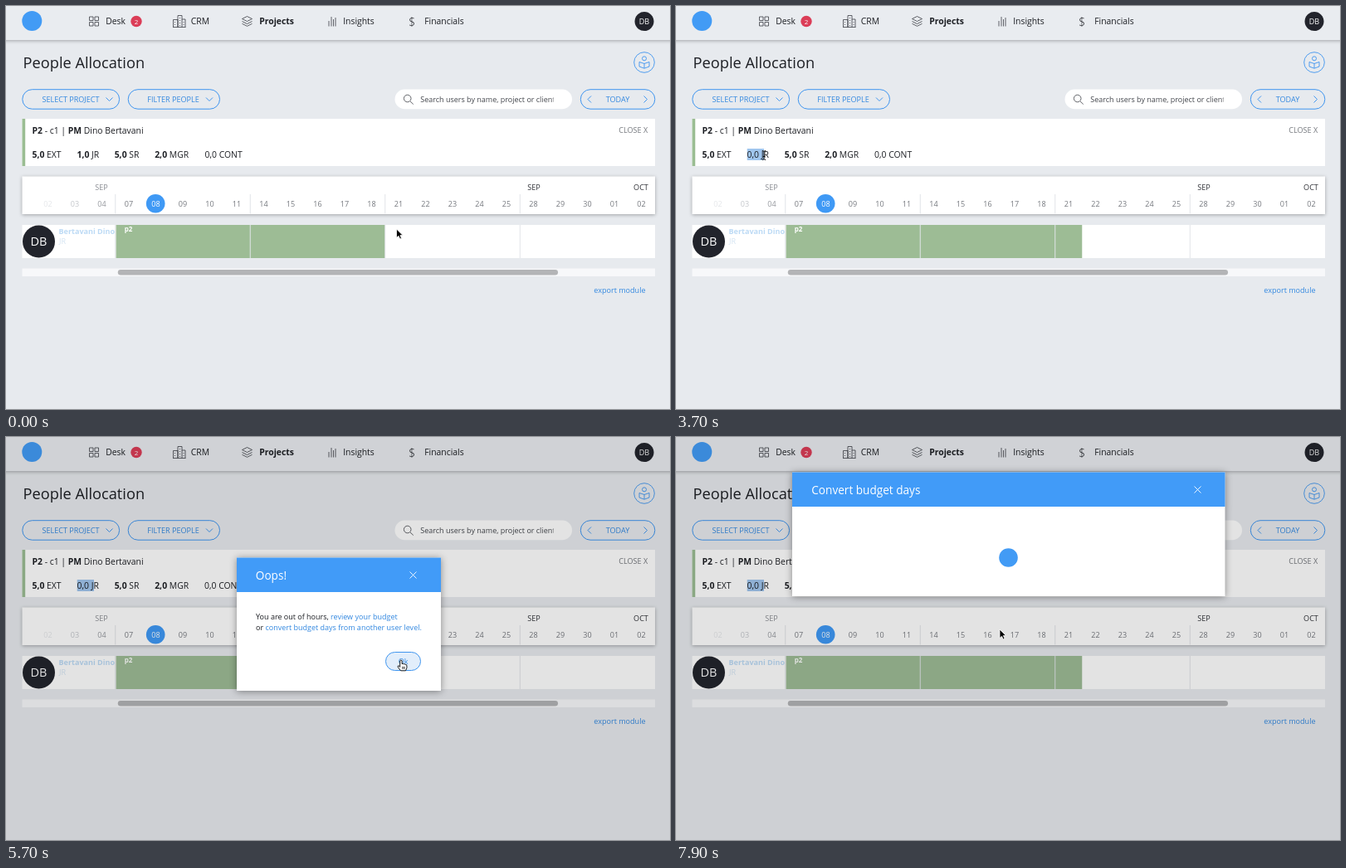
These frames come from a looping animation (800 px wide and 486 px high, 8 s). An HTML page:

```html
<!DOCTYPE html>
<html lang="en">
<head>
<meta charset="utf-8">
<title>People Allocation</title>
<style>
  html, body { margin: 0; width: 100%; height: 100%; overflow: hidden; background: #e7eaee; }
  svg { display: block; width: 100vw; height: 100vh; font-family: "Open Sans", "Noto Sans", sans-serif; font-size: 9.05px; }
  text { white-space: pre; }
  .nav, .stat { font-size: 10.4px; }
  .line { fill: none; stroke: #3f95ef; }
  .icon { fill: none; stroke: #3b3e45; stroke-width: .8; }
  .blue { fill: #3388e0; }
  .white { fill: #fff; }
  .mid { text-anchor: middle; }
  .bold { font-weight: 700; }
  .card { filter: drop-shadow(0 1px 2px rgba(0,0,0,.3)); }
  .modal { filter: drop-shadow(0 1px 4px rgba(0,0,0,.4)); }
</style>
</head>
<body>
<svg id="stage" viewBox="0 0 800 486" fill="#1d1f24">
  <rect width="800" height="486" fill="#e7eaee"/>

  <g id="topbar">
    <rect class="card" x="-5" y="-5" width="810" height="46" fill="#e9ecf0"/>
    <circle cx="31.3" cy="18" r="12" fill="#429bf5"/>
    <path class="icon" d="M100.5 13h4.5v4.5h-4.5zM107 13h4.500v4.500h-4.500zM100.500 19.500h4.500v4.500h-4.500zM107 19.500h4.500v4.500h-4.500z"/>
    <path class="icon" d="M201.500 25.500V16.500H207V25.500M207 25.500V11.500H212V25.500M212 16H216V25.500M201 25.500H216.500M203.500 19v1M203.500 22v1M209.500 14v1M209.500 17v1M209.500 20v1M209.500 23v1M214 19v1M214 22v1"/>
    <path class="icon" d="M290.500 12.500L296.500 15.500L290.500 18.500L284.500 15.500ZM284.500 18.500L290.500 21.500L296.500 18.500M284.500 21.300L290.500 24.300L296.500 21.300"/>
    <path class="icon" d="M389 24.500V18M392 24.500V13M394.500 24.500V16M397 24.500V14"/>
    <text x="485" y="24" font-size="14" font-weight="300">$</text>
    <g class="nav">
      <text x="120.200" y="22.300">Desk</text>
      <text x="222.700" y="22.300">CRM</text>
      <text class="bold" x="305.200" y="22.300">Projects</text>
      <text x="406.200" y="22.300">Insights</text>
      <text x="504.200" y="22.300">Financials</text>
    </g>
    <circle cx="157" cy="18.500" r="6.700" fill="#db3d57"/>
    <text class="mid white" x="157" y="21.500" font-size="8">2</text>
    <circle cx="769" cy="18.600" r="11.500" fill="#22242c"/>
    <text class="mid white" x="769" y="22" font-size="9">DB</text>
  </g>

  <text x="20.600" y="74.500" font-size="18.200">People Allocation</text>
  <g class="line" stroke-width=".9">
    <circle cx="769" cy="68" r="12.300"/>
    <circle cx="769" cy="63.300" r="2.500"/>
    <path d="M763 67.500L769 69.500L775 67.500V73L769 75.200L763 73ZM769 69.500V75"/>
  </g>

  <g class="line">
    <rect x="19.800" y="100.700" width="116.800" height="23.500" rx="11.750"/>
    <rect x="147.200" y="100.700" width="110.300" height="23.500" rx="11.750"/>
    <rect x="692.300" y="100.700" width="89.500" height="23.500" rx="11.750"/>
    <path d="M120.500 110.500l4 4l4 -4M241 110.500l4 4l4 -4M705 108.500l-4 4l4 4M768.500 108.500l4 4l-4 4"/>
  </g>
  <g class="blue">
    <text x="43.500" y="115.500">SELECT PROJECT</text>
    <text x="170.300" y="115.500">FILTER PEOPLE</text>
    <text class="mid" x="737" y="115.500">TODAY</text>
    <text x="708.300" y="346">export module</text>
  </g>
  <rect class="white" x="468.500" y="100.500" width="213.500" height="23.800" rx="11.900"/>
  <path class="icon" d="M487 115L490.800 118.500M488 111.500a4.300 4.300 0 1 0 -8.600 0a4.300 4.300 0 1 0 8.600 0"/>
  <clipPath id="field"><rect x="498" y="102" width="161.500" height="20"/></clipPath>
  <text x="499.300" y="115.500" font-size="9" fill="#44474d" clip-path="url(#field)">Search users by name, project or client</text>

  <rect class="white" x="19.500" y="136" width="762.500" height="57"/>
  <rect x="19.500" y="136" width="3.700" height="57" fill="#9bbd93"/>
  <rect id="selection" x="85.700" y="172" height="14" fill="#a0c6ee"/>
  <g class="stat">
    <text x="31.500" y="154.200"><tspan class="bold">P2</tspan> - c1 | <tspan class="bold">PM</tspan> Dino Bertavani</text>
    <g id="stats"></g>
  </g>
  <text x="738.300" y="152.800" fill="#73767c">CLOSE X</text>

  <rect class="white card" x="19.500" y="205.500" width="762.500" height="45.500"/>
  <circle cx="180.200" cy="238.300" r="11.300" fill="#3f99f5"/>
  <g id="calendar" class="mid"></g>

  <rect class="white" x="19.500" y="264" width="762.500" height="40"/>
  <rect id="bar" x="132.500" y="264" height="40" fill="#9dbc95"/>
  <rect id="hover" y="264" width="32.500" height="20" fill="#8ec0f4"/>
  <g id="weeks"></g>
  <text class="bold white" x="142.800" y="272" font-size="8">p2</text>
  <circle cx="39.500" cy="284" r="19.500" fill="#22242c"/>
  <text class="mid white" x="39.500" y="289.300" font-size="14.500">DB</text>
  <text class="bold" x="63.500" y="275" fill="#bcdaf5">Bertavani Dino</text>
  <text x="64" y="287" fill="#d3e3f2">JR</text>
  <rect x="19.500" y="316.500" width="762.500" height="9.500" fill="#f7f8fa"/>
  <rect x="134.800" y="318" width="530.200" height="6.600" rx="3.300" fill="#b3b4b6"/>

  <rect id="shade" width="800" height="486" fill="#000" opacity=".11"/>

  <g id="warning">
    <g class="modal">
      <rect class="white" x="278" y="145.500" width="246" height="160.500"/>
      <rect x="278" y="145.500" width="246" height="41.500" fill="#419bf8"/>
    </g>
    <text class="white" x="300.800" y="171.500" font-size="13.600">Oops!</text>
    <path d="M486.500 162.500l8 8m0 -8l-8 8" stroke="#fff" stroke-width=".9"/>
    <text x="301" y="220" font-size="9">You are out of hours, <tspan class="blue">review your budget</tspan></text>
    <text x="301" y="232.500" font-size="9">or <tspan class="blue">convert budget days from another user level.</tspan></text>
    <rect id="ok" class="line" x="457.500" y="259.500" width="42" height="22" rx="11"/>
    <text class="mid blue" x="478.700" y="273.700">Ok</text>
  </g>

  <g id="convert">
    <g class="modal">
      <rect class="white" x="140" y="42.500" width="521.500" height="149.500"/>
      <rect x="140" y="42.500" width="521.500" height="41.500" fill="#419bf8"/>
    </g>
    <text class="white" x="163.300" y="68.500" font-size="13.600">Convert budget days</text>
    <path d="M624.500 59.500l8 8m0 -8l-8 8" stroke="#fff" stroke-width=".9"/>
    <circle cx="400.500" cy="145.500" r="11.300" fill="#429bf5"/>
  </g>

  <g id="cursor">
    <path id="arrow" d="M0 0V10.500L2.500 8.300L4.200 12L6 11.200L4.400 7.600H7.600Z" fill="#000" stroke="#fff" stroke-width=".8"/>
    <path id="hand" d="M-1.200 1Q0 -.7 1.200 1V4.800Q2.500 4 3.400 5.100Q4.600 4.500 5.300 5.700Q7 5.300 7 7V9.500L5.600 13H-.3L-3.500 9Q-4.500 7 -2.800 7L-1.200 8.500ZM2 8V11M4 8V11" fill="#fff" stroke="#000" stroke-width=".9" stroke-linejoin="round"/>
    <path id="ibeam" d="M-2.200 -5.500Q0 -5.500 0 -4.300Q0 -5.500 2.200 -5.500M0 -4.300V4.300M-2.200 5.500Q0 5.500 0 4.300Q0 5.500 2.200 5.500M-1.300 1.500H1.300" fill="none" stroke="#000" stroke-width=".9"/>
  </g>
</svg>

<script>
const LOOP = 8000, STEP = 100;
const COL = 32.5, LEFT = 131.75;
const BOOKED = 700, WARNED = 4600, CONVERTED = 7200;
const $ = id => document.getElementById(id);

// Pointer hot spot: time, x, y
const path = [
  [0, 470.5, 269], [300, 473, 272], [900, 473, 272], [1400, 402, 266],
  [1500, 377, 259], [2200, 120, 186], [2600, 87.5, 180], [3000, 87.5, 180],
  [3500, 106, 180], [3700, 106, 180], [4300, 495, 277], [5500, 495, 277],
  [6600, 390, 232], [LOOP, 390, 232]
];

function pointerAt(t) {
  const i = Math.max(1, path.findIndex(p => p[0] >= t));
  const [t0, x0, y0] = path[i - 1], [t1, x1, y1] = path[i];
  const k = (t - t0) / (t1 - t0);
  return { x: x0 + (x1 - x0) * k, y: y0 + (y1 - y0) * k };
}

const inside = (p, x0, y0, x1, y1) => p.x >= x0 && p.x <= x1 && p.y >= y0 && p.y <= y1;
const show = (id, on) => $(id).setAttribute("display", on ? "inline" : "none");

function hoveredColumn(t) {
  if (t < 200 || t >= WARNED) return -1;
  const p = pointerAt(t - STEP);
  return inside(p, LEFT, 264, 782, 304) ? Math.floor((p.x - LEFT) / COL) : -1;
}

function buildCalendar() {
  const label = (x, y, text, fill) => `<text x="${x}" y="${y}" fill="${fill}">${text}</text>`;
  const pad = n => String(n).padStart(2, "0");
  const faded = ["#e4e6e9", "#c2c5ca", "#95989e"];
  let out = label(115, 221.8, "SEP", "#8b8e94") + label(636, 221.8, "SEP", "#303238") + label(765, 221.8, "OCT", "#303238");
  for (let i = -3; i < 20; i++) {
    const day = i < 0 ? 5 + i : 7 + i + 2 * Math.floor(i / 5);
    const fill = i < 0 ? faded[i + 3] : i === 1 ? "#fff" : "#75787e";
    out += label(148 + COL * i, 241.5, pad(day > 30 ? day - 30 : day), fill);
  }
  let weeks = "";
  for (let i = 0; i < 20; i += 5) {
    const line = (y0, y1) => `<path d="M${LEFT + COL * i} ${y0}V${y1}" stroke="#e1e4e8"/>`;
    out += line(227, 250.5);
    weeks += line(264, 304);
  }
  $("calendar").innerHTML = out;
  $("weeks").innerHTML = weeks;
}

function buildStats(juniorDays) {
  const items = [[31.5, 5, "EXT"], [85.5, juniorDays, "JR"], [130.7, 5, "SR"], [179.2, 2, "MGR"], [juniorDays ? 239.5 : 239, 0, "CONT"]];
  return items.map(([x, days, level]) =>
    `<text x="${x}" y="182.700"><tspan${days ? ' class="bold"' : ""}>${days},0</tspan> ${level}</text>`).join("");
}

let shownDays = -1;

function draw(t) {
  const p = pointerAt(t), column = hoveredColumn(t);
  const booked = t >= BOOKED, warned = t >= WARNED && t < CONVERTED;

  const days = booked ? 0 : 1;
  if (days !== shownDays) $("stats").innerHTML = buildStats(shownDays = days);
  $("bar").setAttribute("width", COL * (booked ? 11 : 10) - .75);
  show("hover", column >= 0);
  $("hover").setAttribute("x", LEFT + COL * Math.max(column, 0));
  $("selection").setAttribute("width", t < 3000 ? 0 : Math.max(0, pointerAt(Math.min(t, 3500)).x - 85.7));

  show("shade", t >= WARNED);
  show("warning", warned);
  show("convert", t >= CONVERTED);

  const onOk = warned && inside(p, 457, 259, 500, 282);
  const onLink = warned && inside(p, 312, 224, 500, 236);
  $("ok").style.fill = onOk ? "#e2eefb" : "#fff";

  const kind = column >= 0 || onOk || onLink ? "hand"
    : t < WARNED && inside(p, 30, 170, 290, 190) ? "ibeam" : "arrow";
  for (const name of ["arrow", "hand", "ibeam"]) show(name, name === kind);
  $("cursor").setAttribute("transform", `translate(${p.x} ${p.y})`);
}

buildCalendar();
const start = performance.now();
function tick() {
  const t = (performance.now() - start) % LOOP;
  draw(Math.floor(t / STEP) * STEP);
  requestAnimationFrame(tick);
}
tick();
</script>
</body>
</html>
```
